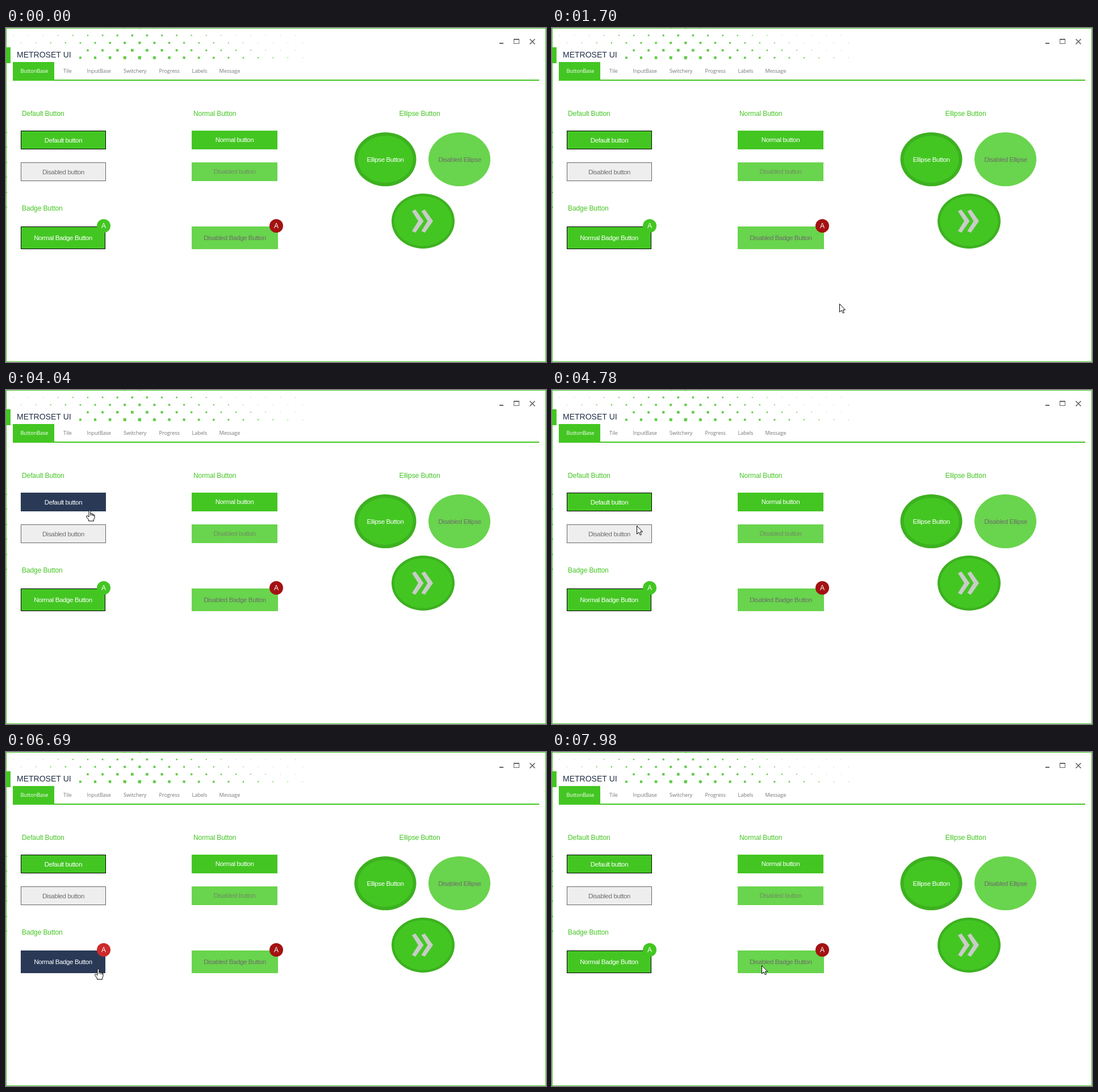
Animation, 951 px wide and 589 px high, one loop 8000 ms. Source, as an HTML page with a canvas:

```html
<!DOCTYPE html>
<html lang="en">
<head>
<meta charset="utf-8">
<title>MetroSet UI</title>
<style>
  html, body { margin: 0; width: 100%; height: 100%; overflow: hidden; background: #fff; }
  canvas { display: block; }
</style>
</head>
<body>
<canvas id="stage" width="951" height="589"></canvas>
<script>
const ctx = document.getElementById('stage').getContext('2d');
const LOOP = 8000;
const GREEN = '#43c622', PALE = '#69d44d', RING = '#3db120', NAVY = '#2a3a56';
const GREY = '#6d6d6d', RED = '#cd2a2a', DARK_RED = '#a31212';

const FONT = {
  title: ['14px "Liberation Sans", Arial, sans-serif', '0px'],
  tab: ['9.2px "Open Sans", sans-serif', '-0.1px'],
  label: ['12px "Liberation Sans", Arial, sans-serif', '-0.1px'],
  button: ['11.5px "Liberation Sans", Arial, sans-serif', '-0.38px']
};

const smooth = u => u * u * (3 - 2 * u);
const cubic = u => u * u * u;

// start, end, steps, from, bend, to, easing
const MOVES = [
  [360, 1010, 11, [788, 588], [740, 566], [694, 555], smooth],
  [1190, 1930, 14, [694, 555], [509, 483], [472, 476], smooth],
  [2030, 2810, 13, [472, 476], [353, 465], [282, 350], smooth],
  [2840, 3620, 13, [282, 350], [205, 255], [146, 205], smooth],
  [3910, 4430, 9, [146, 205], [148, 219], [150, 233], smooth],
  [4620, 5380, 12, [150, 233], [148, 251], [143, 267], smooth],
  [5480, 6000, 9, [143, 267], [141, 336], [152, 365], smooth],
  [6240, 6910, 13, [152, 365], [156, 396], [228, 395], cubic],
  [7070, 7850, 13, [228, 395], [288, 392], [349, 379], smooth],
  [7950, 7980, 2, [349, 379], [359, 377], [369, 376], smooth]
];

function pointerAt(t) {
  const move = MOVES.filter(m => t >= m[0]).pop();
  if (!move) return null;
  const [start, end, steps, a, b, c, ease] = move;
  const step = Math.floor((t - start) / (end - start) * (steps - 1) + 1e-6) + 1;
  const s = ease(Math.min(1, step / steps)), r = 1 - s;
  return a.map((v, i) => Math.round(r * r * v + 2 * r * s * b[i] + s * s * c[i]));
}

const inside = (p, x, y, w, h) =>
  !!p && p[0] >= x && p[0] < x + w && p[1] >= y && p[1] < y + h;

function rect(x, y, w, h, fill, border) {
  ctx.fillStyle = fill;
  ctx.fillRect(x, y, w, h);
  if (!border) return;
  ctx.strokeStyle = border;
  ctx.lineWidth = 1;
  ctx.strokeRect(x + .5, y + .5, w - 1, h - 1);
}

function ellipse(x, y, rx, ry, fill) {
  ctx.fillStyle = fill;
  ctx.beginPath();
  ctx.ellipse(x, y, rx, ry, 0, 0, Math.PI * 2);
  ctx.fill();
}

function text(str, x, y, style, color, align = 'left') {
  const [font, spacing] = FONT[style];
  ctx.font = font;
  ctx.letterSpacing = spacing;
  ctx.textAlign = align;
  ctx.fillStyle = color;
  ctx.fillText(str, x, y);
}

function button(str, x, y, w, h, base, fill, color, border) {
  rect(x, y, w, h, fill, border);
  text(str, x + w / 2, base, 'button', color, 'center');
}

function badge(x, y, fill) {
  ellipse(x, y, 12, 12, fill);
  text('A', x, y + 4, 'label', '#fff', 'center');
}

function polygon(points, fill) {
  ctx.beginPath();
  points.forEach(([x, y]) => ctx.lineTo(x, y));
  ctx.closePath();
  ctx.fillStyle = fill;
  ctx.fill();
}

function halftone() {
  ctx.fillStyle = '#62cb49';
  for (let row = 0; row < 5; row++) {
    for (let x = row % 2 ? 13 : 26; x < 530; x += 26.1) {
      if (row > 2 && x < 125) continue;
      const size = 5.5 - Math.abs(x - 232) / 62 - (4 - row) * .6;
      if (row === 0 && size < 2.2) continue;
      const d = Math.max(.9, size);
      ctx.save();
      ctx.translate(x + .5, row * 13.1);
      ctx.rotate(Math.sin(x * 1.7 + row) * .35);
      ctx.fillRect(-d / 2, -d / 2, d, d);
      ctx.restore();
    }
  }
  for (let y = 183; y < 320; y += 26.4) ctx.fillRect(0, Math.round(y), 2, 2);
}

function windowIcons() {
  rect(869, 26, 7, 2, '#666');
  rect(894, 19, 10, 9, '#fff', '#666');
  rect(894, 19, 10, 2, '#666');
  ctx.strokeStyle = '#666';
  ctx.lineWidth = 1.7;
  ctx.beginPath();
  ctx.moveTo(922.5, 19.5); ctx.lineTo(931.5, 28.5);
  ctx.moveTo(931.5, 19.5); ctx.lineTo(922.5, 28.5);
  ctx.stroke();
}

function header() {
  halftone();
  rect(0, 34, 8, 28, GREEN);
  text('METROSET UI', 19, 52, 'title', '#1f2d45');
  windowIcons();
  rect(12, 91, 927, 2, GREEN);
  rect(12, 60, 73, 32, GREEN);
  text('ButtonBase', 25.5, 79, 'tab', '#fff');
  [['Tile', 101], ['InputBase', 142.5], ['Switchery', 207], ['Progress', 269.5],
   ['Labels', 327.5], ['Message', 375.5]]
    .forEach(([name, x]) => text(name, x, 79, 'tab', '#777'));
}

function ellipses() {
  ellipse(668, 231.5, 54.5, 47.5, RING);
  ellipse(668, 231.5, 48.5, 41.5, GREEN);
  text('Ellipse Button', 668, 236, 'button', '#fff', 'center');
  ellipse(798.5, 231.5, 54.5, 47.5, PALE);
  text('Disabled Ellipse', 799, 236, 'button', GREY, 'center');
  ellipse(734.5, 340.5, 55.5, 48.5, RING);
  ellipse(734.5, 340.5, 51, 44, GREEN);
  for (const x of [715, 731.5]) {
    polygon([[x, 323], [x + 6, 320], [x + 20.5, 340.5], [x + 6, 361], [x, 358], [x + 11, 340.5]],
      '#c9ccc8');
  }
}

const ARROW = new Path2D('M0 0V14.5L3.5 11.3 5.8 16.3 8 15.3 5.8 10.6H10Z');
const HAND = new Path2D('M-1.5 .8Q0 -.8 1.5 .8V5.5L4.3 6 6.7 6.8 8.5 8.3V13L7 16V18.5H-2V16.3' +
  'L-6 11Q-6 8.7 -4 9.3L-1.5 11.3Z');
const KNUCKLES = new Path2D('M1.5 5V9M4.3 6V9.5M6.7 6.8V10');

function pointer(p, hand) {
  ctx.save();
  ctx.translate(p[0] + .5, p[1] + .5);
  ctx.fillStyle = '#fff';
  ctx.strokeStyle = '#000';
  ctx.lineWidth = 1;
  const shape = hand ? HAND : ARROW;
  ctx.fill(shape);
  ctx.stroke(shape);
  if (hand) ctx.stroke(KNUCKLES);
  ctx.restore();
}

function draw(t) {
  const p = pointerAt(t);
  const onDefault = inside(p, 26, 181, 150, 33);
  const onBadge = inside(p, 26, 336, 159, 54);

  rect(0, 0, 951, 589, '#fff');
  header();

  text('Default Button', 28, 155, 'label', GREEN);
  text('Normal Button', 330, 155, 'label', GREEN);
  text('Ellipse Button', 692.5, 155, 'label', GREEN);
  text('Badge Button', 28, 322, 'label', GREEN);

  button('Default button', 26, 181, 150, 33, 202, onDefault ? NAVY : GREEN, '#fff',
    onDefault ? NAVY : '#000');
  button('Disabled button', 26, 237, 150, 33, 258, '#eee', GREY, '#666');
  button('Normal button', 327, 181, 151, 33, 201, GREEN, '#fff');
  button('Disabled button', 327, 237, 151, 33, 257, PALE, '#6f8d66');
  button('Normal Badge Button', 26, 350, 149, 40, 374, onBadge ? NAVY : GREEN, '#fff',
    onBadge ? NAVY : '#000');
  badge(172, 349, onBadge ? RED : GREEN);
  button('Disabled Badge Button', 327, 350, 152, 40, 374, PALE, GREY);
  badge(476, 349, DARK_RED);

  ellipses();
  ctx.strokeStyle = GREEN;
  ctx.lineWidth = 1;
  ctx.strokeRect(.5, .5, 950, 588);
  if (p) pointer(p, onDefault || onBadge);
}

const begin = performance.now();
function tick() {
  draw((performance.now() - begin) % LOOP);
  requestAnimationFrame(tick);
}
tick();
</script>
</body>
</html>
```
